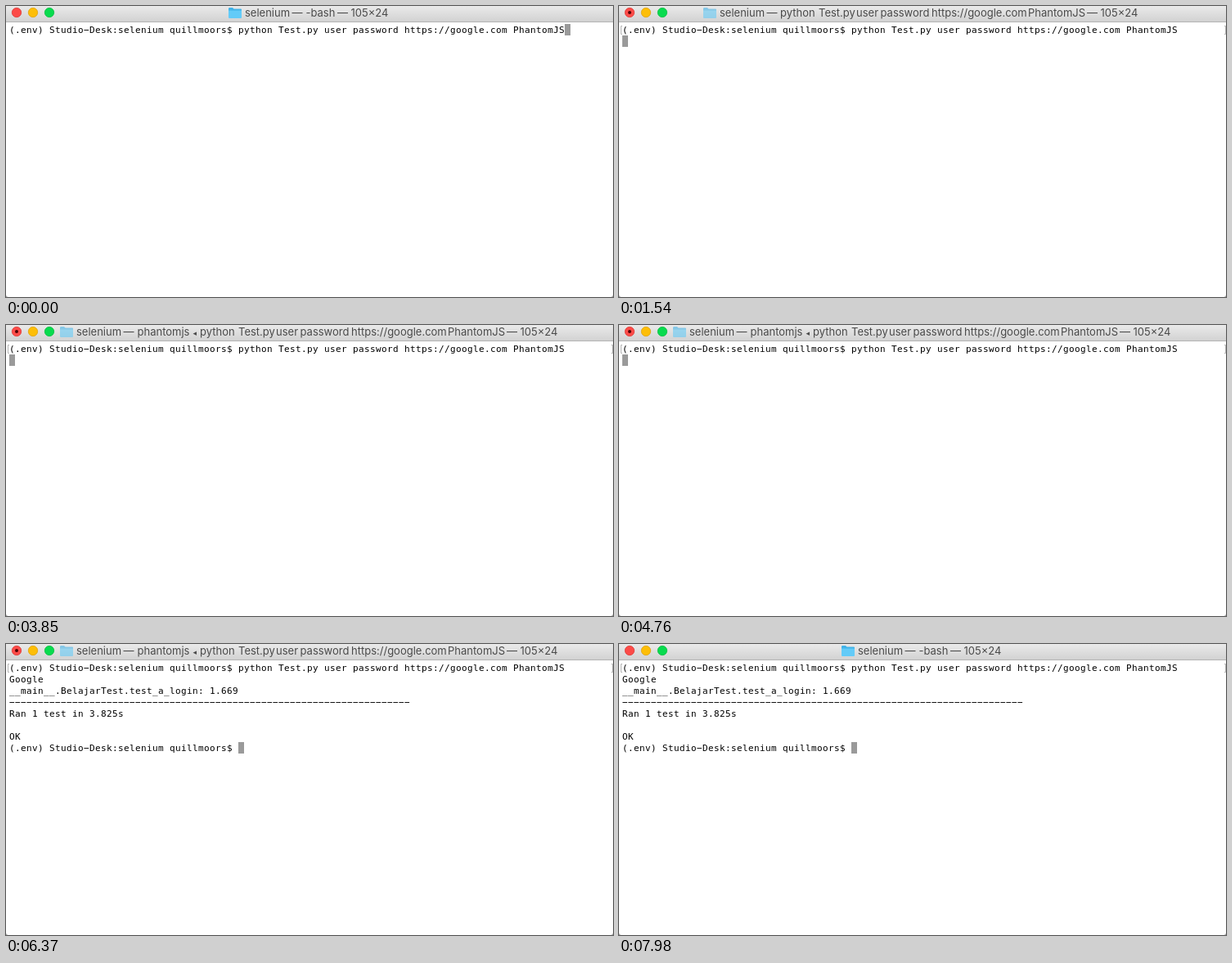
Write an HTML page that moves like this. It is 742 px wide and 356 px high and loops after 8000 ms.

```html
<!DOCTYPE html>
<html lang="en">
<head>
<meta charset="utf-8">
<title>Terminal</title>
<style>
  html, body { margin: 0; width: 100%; height: 100%; overflow: hidden; background: #fff; }
  svg { display: block; }
  .title { font: 13px Inter, Roboto, sans-serif; fill: #4a4a4a; }
  .mono { font: 11px "DejaVu Sans Mono", "Liberation Mono", monospace; letter-spacing: .378px; fill: #000; white-space: pre; }
</style>
</head>
<body>
<svg width="742" height="356" viewBox="0 0 742 356">
  <defs>
    <linearGradient id="bar" x2="0" y2="1">
      <stop offset="0" stop-color="#eaeaea"/>
      <stop offset="1" stop-color="#d2d2d2"/>
    </linearGradient>
  </defs>
  <rect width="742" height="356" fill="#fff"/>
  <rect width="742" height="19" fill="url(#bar)"/>
  <rect y="19" width="742" height="1" fill="#b4b4b4"/>
  <g stroke-width=".8">
    <circle cx="13" cy="8" r="5.7" fill="#fc4b48" stroke="#de3b38"/>
    <circle cx="33" cy="8" r="5.7" fill="#fdbe08" stroke="#dfa310"/>
    <circle cx="53" cy="8" r="5.7" fill="#08db4e" stroke="#10bd43"/>
  </g>
  <circle id="busy" cx="13" cy="8" r="2" fill="#4d0304"/>
  <g id="folder">
    <path d="M0 1.2Q0 0 1.2 0H5L6.6 1.6H15Q16 1.6 16 2.6V12H0Z" fill="#41b3e8"/>
    <path d="M0 3.6H16V12Q16 13 15 13H1Q0 13 0 12Z" fill="#63cbf8"/>
  </g>
  <text id="title" class="title" y="13"></text>
  <rect id="cursor" width="7" height="14" fill="#9a9a9a"/>
  <path id="marks" d="M4 24.5H2.5V34.5H4M740 24.5H741.5V34.5H740" fill="none" stroke="#b4b4b4"/>
  <g id="lines" class="mono"></g>
  <path d="M0 354V356H2ZM742 354V356H740Z" fill="#a8a8a8"/>
</svg>
<script>
const LOOP = 8000, ENTER = 1470, BROWSER = 2520, OUTPUT = 6370, DONE = 6580;
const CELL = 7, ROW = 14, LEFT = 4, TOP = 22;
const $ = id => document.getElementById(id);

const prompt = "(.env) Studio-Desk:selenium quillmoors$ ";
const command = "python Test.py user password https://google.com PhantomJS";
const rows = [
  prompt + command,
  "Google",
  "__main__.BelajarTest.test_a_login: 1.669",
  "-".repeat(70),
  "Ran 1 test in 3.825s",
  "",
  "OK",
  prompt
];

// Each title is a folder position plus words with their left edges.
const size = x => [[x, "—"], [x + 16.5, "105×24"]];
const head = x => [[x, "selenium"], [x + 57.5, "—"]];
const offsets = [0, 47, 93, 122.5, 185, 303];
const call = x => [...command.split(" ").map((w, i) => [x + offsets[i], w]), ...size(x + 375)];
const titles = {
  bash: { folder: 272, words: [...head(292), [366.5, "-bash"], ...size(405)] },
  python: { folder: 103, words: [...head(123), ...call(197)] },
  browser: { folder: 66, words: [...head(86), [160.5, "phantomjs"], [228.5, "◂"], ...call(237)] }
};

function make(tag, attrs, text, parent) {
  const el = document.createElementNS("http://www.w3.org/2000/svg", tag);
  for (const key in attrs) el.setAttribute(key, attrs[key]);
  el.textContent = text;
  parent.append(el);
  return el;
}

// The terminal face has long hyphens, so a minus sign stands in.
const lines = rows.map((row, i) =>
  make("text", { x: LEFT, y: TOP + 11 + i * ROW }, row.replace(/-/g, "\u2212"), $("lines")));

const show = (el, on) => el.setAttribute("visibility", on ? "visible" : "hidden");

let current = "";
function setTitle(name) {
  if (name === current) return;
  current = name;
  const { folder, words } = titles[name];
  $("folder").setAttribute("transform", `translate(${folder} 2)`);
  $("title").replaceChildren();
  for (const [x, word] of words) {
    const style = word === "◂" ? "font:9px 'DejaVu Sans',sans-serif" : "";
    make("tspan", { x, style }, word, $("title"));
  }
}

function setCursor(col, row) {
  $("cursor").setAttribute("x", LEFT + col * CELL);
  $("cursor").setAttribute("y", TOP + row * ROW);
}

function draw(t) {
  const entered = t >= ENTER, printed = t >= OUTPUT;
  const running = entered && t < DONE;
  setTitle(!running ? "bash" : t < BROWSER ? "python" : "browser");
  $("folder").setAttribute("opacity", running ? .58 : 1);
  show($("busy"), running);
  show($("marks"), entered);
  lines.forEach((line, i) => show(line, i === 0 || printed));
  if (printed) setCursor(prompt.length, rows.length - 1);
  else if (entered) setCursor(0, 1);
  else setCursor(rows[0].length, 0);
}

const start = performance.now();
function tick() {
  draw((performance.now() - start) % LOOP);
  requestAnimationFrame(tick);
}
tick();
</script>
</body>
</html>
```
